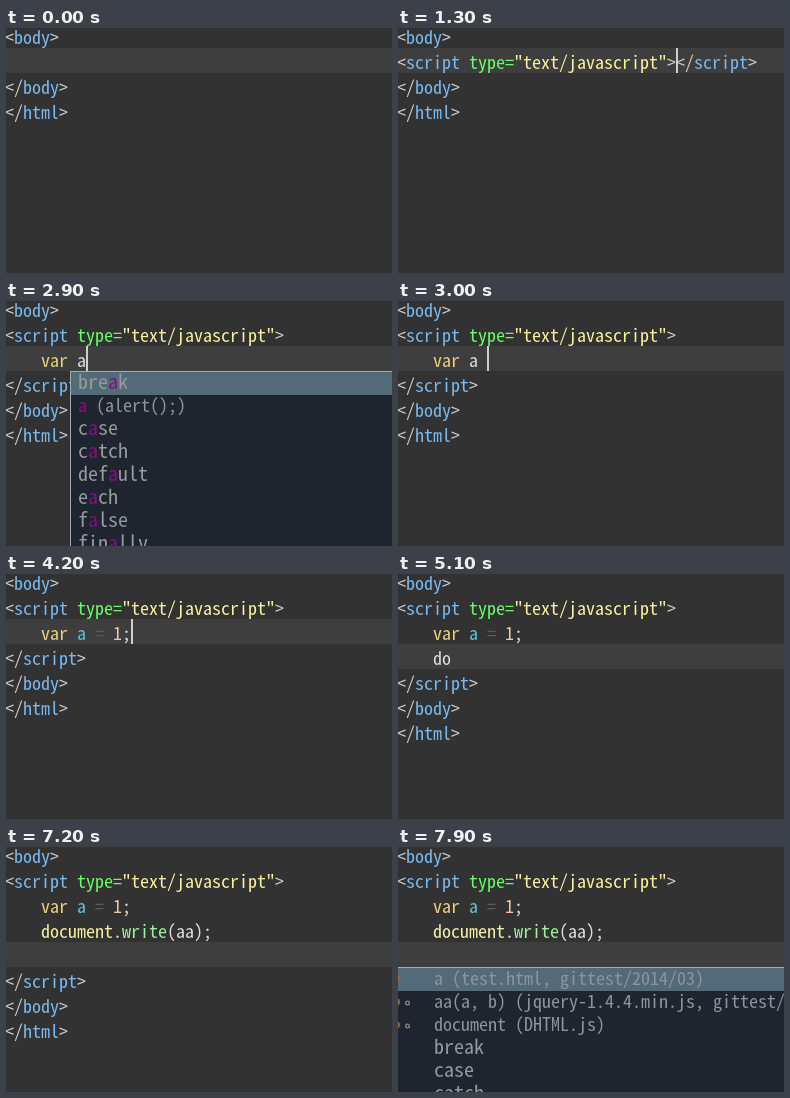
Animation of 386x245 px, one loop 8 s. Source, as an HTML page with a canvas:

```html
<!DOCTYPE html>
<html lang="en">
<head>
<meta charset="utf-8">
<title>Code editor typing</title>
<style>
  html, body { margin: 0; width: 100%; height: 100%; overflow: hidden; background: #323232; }
  canvas { display: block; }
</style>
</head>
<body>
<canvas id="stage" width="386" height="245"></canvas>
<script>
const ctx = document.getElementById('stage').getContext('2d');
const LOOP = 8000, CHAR = 9, WORD_CHAR = 10, LINE = 25, ITEM = 23;
const FAMILY = '"Noto Sans Mono CJK JP", "Noto Sans Mono CJK SC", "Noto Sans Mono", monospace';
const CODE_FONT = fontWithAdvance(CHAR);
const WORD_FONT = fontWithAdvance(WORD_CHAR);
const PLAIN = '#dcdcdc';

// Each rule: pattern and colour; the first match wins.
const RULES = [
  [/^(<\/?|>)/, '#cccccc'],
  [/^type=/, '#66ff66'],
  [/^"[^"]*"/, '#f8f29b'],
  [/^(body|html|script)\b/, '#78b9f0'],
  [/^var\b/, '#efcf7c'],
  [/^a(?= =)/, '#5cc4d8'],
  [/^=/, '#5c5c5c'],
  [/^\d+/, '#f3c3ab'],
  [/^document\b/, '#f2efa6'],
  [/^write\b/, '#9df29d'],
  [/^\s+/, PLAIN],
  [/^\w+/, PLAIN],
  [/^./, PLAIN]
];

const open = '\n<script type="text/javascript">';
const close = '<\/script>';
const script = code => `${open}\n    ${code}\n${close}`;
const second = code => script(`var a = 1;\n    ${code}`);
const third = code => second(`document.write(aa);\n    ${code}`);

const wordPopup = {
  x: 64, y: 70, textX: 73, match: 'a',
  items: ['break', 'a (alert();)', 'case', 'catch', 'default', 'each', 'false', 'finally']
};
const memberPopup = {
  x: -1, y: 120, textX: 37, icons: 3,
  items: ['a (test.html, gittest/2014/03)', 'aa(a, b) (jquery-1.4.4.min.js, gittest/2014/03)',
    'document (DHTML.js)', 'break', 'case', 'catch']
};

// [start, highlighted row, inserted text with "|" as caret, popup]
const STEPS = [
  [0, 1, '\n'],
  [300, 0, '|\n'],
  [700, 1, '\n|'],
  [1000, 1, '\ns|'],
  [1200, 1, '\nsc|'],
  [1300, 1, `${open}|${close}`],
  [1900, 2, script('')],
  [2000, 2, script('|')],
  [2200, 2, script('v|')],
  [2300, 2, script('va|')],
  [2500, 2, script('var|')],
  [2600, 2, script('var |')],
  [2800, 2, script('var a|'), wordPopup],
  [3000, 2, script('var a |')],
  [3200, 2, script('var a ')],
  [3500, 2, script('var a =')],
  [3800, 2, script('var a = |')],
  [3900, 2, script('var a = 1|')],
  [4100, 2, script('var a = 1;')],
  [4200, 2, script('var a = 1;|')],
  [4400, 3, second('')],
  [4500, 3, second('|')],
  [4900, 3, second('d|')],
  [5100, 3, second('do')],
  [5200, 3, second('do|')],
  [5400, 3, second('doc|')],
  [5500, 3, second('document|')],
  [5600, 3, second('document.write();')],
  [5700, 3, second('document.write(|);')],
  [6100, 3, second('document.write(a|);')],
  [6300, 3, second('document.write(aa|);')],
  [6600, 4, third('')],
  [6700, 4, third('|')],
  [7200, 4, third('')],
  [7900, 4, third(''), memberPopup]
];

function fontWithAdvance(advance) {
  ctx.font = `100px ${FAMILY}`;
  return `${100 * advance / ctx.measureText('0').width}px ${FAMILY}`;
}

function rect(color, x, y, w, h) {
  ctx.fillStyle = color;
  ctx.fillRect(x, y, w, h);
}

function text(string, x, y, color, font) {
  ctx.font = font;
  ctx.fillStyle = color;
  ctx.fillText(string, x, y);
}

function drawLine(line, row) {
  const caret = line.indexOf('|');
  let rest = line.replace('|', ''), column = 0;
  while (rest) {
    const [pattern, color] = RULES.find(rule => rule[0].test(rest));
    const token = rest.match(pattern)[0];
    text(token, column * CHAR - 1, 16 + row * LINE, color, CODE_FONT);
    column += token.length;
    rest = rest.slice(token.length);
  }
  if (caret >= 0) rect('#cfcfcf', caret * CHAR - 1, row * LINE - 5, 2, LINE);
}

function drawItem(label, x, baseline, match) {
  const isWord = /^\w+$/.test(label);
  const font = isWord ? WORD_FONT : CODE_FONT;
  const advance = isWord ? WORD_CHAR : CHAR;
  const marked = match ? label.indexOf(match) : -1;
  [...label].forEach((char, i) => {
    const color = i === marked ? '#850d85' : isWord ? '#969a9e' : '#8d949b';
    text(char, x + i * advance, baseline, color, font);
  });
}

function dot(x, y, radius, color) {
  ctx.fillStyle = color;
  ctx.beginPath();
  ctx.arc(x, y, radius, 0, 7);
  ctx.fill();
}

function drawPopup({ x, y, textX, items, match, icons = 0 }) {
  rect('#1f252f', x, y, 400, 245);
  rect('#536b79', x, y + 1, 400, ITEM);
  rect('#a4a9ac', x, y, 400, 1);
  rect('#a4a9ac', x, y, 1, 245);
  items.forEach((label, i) => {
    const top = y + 1 + i * ITEM;
    drawItem(label, textX - 1, top + 17, match);
    if (i >= icons) return;
    dot(-2, top + 11, 4, '#8a6a48');
    if (i) {
      dot(9.5, top + 12, 2.5, '#858c93');
      dot(9.5, top + 12, 1.2, '#1f252f');
    }
  });
}

function draw() {
  const time = performance.now() % LOOP;
  const [, active, code, popup] = STEPS.findLast(step => step[0] <= time);
  rect('#323232', 0, 0, 386, 245);
  rect('#3e3e3e', 0, active * LINE - 5, 386, LINE);
  `<body>${code}\n</body>\n</html>`.split('\n').forEach(drawLine);
  if (popup) drawPopup(popup);
  requestAnimationFrame(draw);
}
draw();
</script>
</body>
</html>
```
